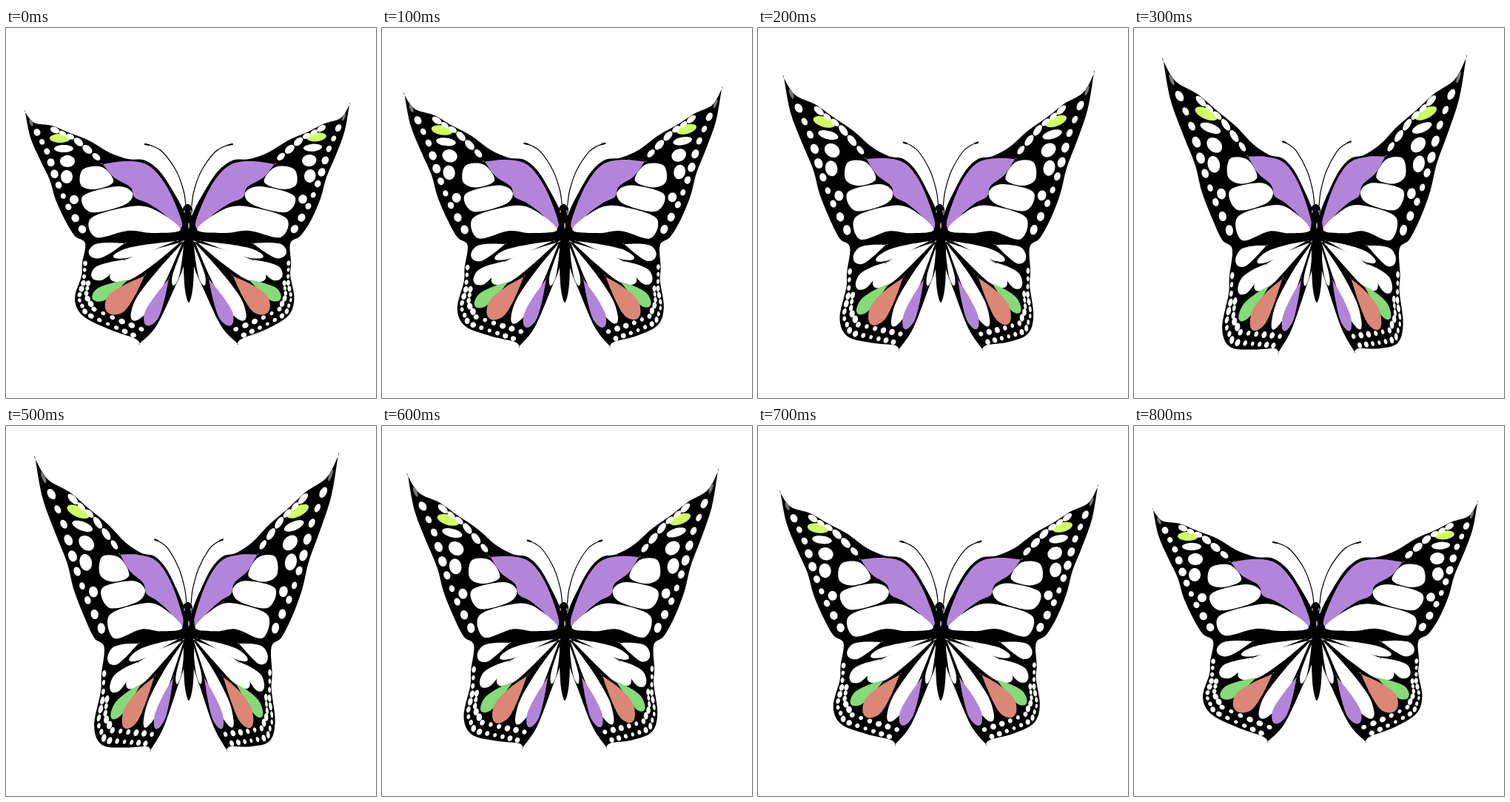
Write an HTML page with a canvas that moves like this. It is 500 by 500 pixels and loops after 900 ms.

```html
<!DOCTYPE html>
<html lang="en">
<head>
<meta charset="utf-8">
<title>Butterfly</title>
<style>
  html, body { margin: 0; width: 100%; height: 100%; overflow: hidden; background: #fff; }
  canvas { display: block; width: 100vmin; height: 100vmin; }
</style>
</head>
<body>
<canvas id="stage" width="500" height="500"></canvas>
<script>
const ctx = document.getElementById('stage').getContext('2d');
const PURPLE = '#b385da', LIME = '#d3fb62', GREEN = '#84db78', CORAL = '#dc8676';
const AXIS = 247, HINGE = 268, SPAN = 221;
const pairs = list => list.flatMap((v, i) => i % 2 ? [] : [[v, list[i + 1]]]);
const mix = (p, q, f) => p.map((v, i) => v + f * (q[i] - v));

// Raising a wing narrows it, except at the tip, and stretches it away from the hinge line.
function flap([x, y], lift, isRight) {
  let u = AXIS - x;
  const v = y - HINGE;
  if (isRight) {
    const lower = Math.max(0, Math.min(1, v / 80));
    u -= (u / SPAN) ** 4 * (4 + 45 * lower);
  }
  const stretch = (u / (v < 0 ? 286 : 210)) ** 2;
  const tilt = isRight ? (u / SPAN) ** 8 * (12 - 6 * lift) : 0;
  const width = u - lift * (0.3 * u - 48 * (u / SPAN) ** 4);
  return [AXIS + (isRight ? width : -width), HINGE + v * (1 + lift * stretch) - tilt];
}

// Smooth curve through all points; a doubled point makes a corner.
function trace(pts, closed) {
  const n = pts.length;
  const at = i => closed ? pts[(i + n) % n] : pts[Math.max(0, Math.min(n - 1, i))];
  ctx.beginPath();
  ctx.moveTo(...pts[0]);
  for (let i = 0; i < (closed ? n : n - 1); i++) {
    const [a, b, c, d] = [at(i - 1), at(i), at(i + 1), at(i + 2)];
    ctx.bezierCurveTo(b[0] + (c[0] - a[0]) / 6, b[1] + (c[1] - a[1]) / 6,
                      c[0] - (d[0] - b[0]) / 6, c[1] - (d[1] - b[1]) / 6, c[0], c[1]);
  }
}
function fillShape(color, pts) {
  ctx.fillStyle = color;
  trace(pts, true);
  ctx.fill();
}
function ellipse(cx, cy, rx, ry, angle = 0) {
  const cos = Math.cos(angle), sin = Math.sin(angle);
  return Array.from({ length: 10 }, (_, i) => {
    const a = i * Math.PI / 5, u = rx * Math.cos(a), v = ry * Math.sin(a);
    return [cx + u * cos - v * sin, cy + u * sin + v * cos];
  });
}

const shapes = [];
const cell = (color, ...list) => shapes.push([color, pairs(list)]);
const spot = (color, ...e) => shapes.push([color, ellipse(...e)]);

// Teardrop with its point at (x0, y0) and its round end at (x1, y1).
function petal(color, x0, y0, x1, y1, width) {
  const dx = x1 - x0, dy = y1 - y0, k = width / 2 / Math.hypot(dx, dy);
  const at = (f, side) => [x0 + f * dx - side * k * dy, y0 + f * dy + side * k * dx];
  shapes.push([color, [at(0, 0), at(0, 0), at(0.4, 0.68), at(0.75, 1), at(0.94, 0.6),
    at(1, 0), at(0.94, -0.6), at(0.75, -1), at(0.4, -0.68)]]);
}

// Evenly spaced dots of varied size, stretched along their path.
function dotRow(list, count, radius, stretch) {
  const path = pairs(list);
  for (let i = 0; i < count; i++) {
    const s = i / (count - 1) * (path.length - 1);
    const k = Math.min(path.length - 2, Math.floor(s)), [p, q] = [path[k], path[k + 1]];
    const r = radius * (1 + 0.2 * Math.sin(i * 5));
    spot('#fff', ...mix(p, q, s - k), r * stretch, r, Math.atan2(q[1] - p[1], q[0] - p[0]));
  }
}

// Silhouette: leading edge, inner margin, scalloped rim, outer edge
cell('#000', 26,114, 26,114, 38,128, 62,132, 84,141, 112,152, 139,168, 165,177, 188,179,
  208,194, 226,221, 240,247, 246,270, 241,318, 226,355, 203,403, 181,426, 181,426,
  173,419, 139,407, 104,389, 93,366, 102,335, 103,318, 107,291, 93,281, 80,260,
  67,232, 59,205, 46,178, 33,148);

// Upper wing
cell(PURPLE, 131,184, 131,184, 160,180, 187,183, 206,198, 223,225, 238,264, 230,270,
  214,252, 192,237, 174,229, 168,215, 146,202);
cell('#fff', 104,191, 130,188, 145,208, 120,218, 101,212);
cell('#fff', 104,227, 150,214, 171,223, 160,239, 115,249);
cell('#fff', 114,258, 158,243, 195,243, 236,272, 198,277, 165,274, 122,283);
spot(LIME, 73,149, 14,6);
spot('#777', 34,128, 2,5, -0.4);
dotRow([66,138, 92,149, 122,174], 6, 4, 1.6);
dotRow([42,141, 57,170, 68,205, 82,238, 103,272], 10, 4.4, 1.1);
spot('#fff', 78,163, 13,5);
spot('#fff', 83,180, 10,8);
spot('#fff', 82,201, 8,9);
spot('#fff', 92,232, 6,6);

// Lower wing
petal('#fff', 160,291, 112,305, 20);
petal('#fff', 229,288, 145,309, 13);
petal('#fff', 160,313, 116,337, 20);
petal('#fff', 235,290, 141,339, 27);
petal('#fff', 238,291, 171,395, 24);
petal('#fff', 240,295, 226,348, 9);
petal(GREEN, 165,340, 117,366, 19);
petal(CORAL, 187,335, 137,384, 30);
petal(PURPLE, 220,339, 190,402, 20);
dotRow([107,318, 105,343, 98,365, 108,386, 140,401, 172,415], 15, 2.9, 1.2);
dotRow([111,345, 108,362, 119,380, 150,394, 183,407], 11, 3.2, 1.2);

const antenna = pairs([243,240, 240,220, 230,193, 212,168, 199,160, 188,157]);
const antennaTip = pairs([193,158, 188,157]);

function drawWing(lift, isRight) {
  const place = pts => pts.map(p => flap(p, lift, isRight));
  shapes.forEach(([color, pts]) => fillShape(color, place(pts)));
  [[antenna, 1.2], [antennaTip, 2.2]].forEach(([pts, width]) => {
    ctx.lineWidth = width;
    trace(place(pts), false);
    ctx.stroke();
  });
}

function drawBody() {
  fillShape('#000', ellipse(245.5,246, 6.5,8));
  fillShape('#000', ellipse(247,273, 8,23));
  fillShape('#000', pairs([241,290, 253,290, 253,345, 247,371, 241,345]));
  [241, 250].forEach(x => fillShape('#888', ellipse(x,248, 1,2)));
  fillShape('#999', ellipse(247,267, 1.2,4));
}

function draw(now) {
  const step = Math.floor(now / 100) % 9;
  const lift = 1 - Math.abs(4 - step) / 4;
  ctx.fillStyle = '#fff';
  ctx.fillRect(0, 0, 500, 500);
  ctx.strokeStyle = '#000';
  ctx.lineCap = 'round';
  drawWing(lift, false);
  drawWing(lift, true);
  drawBody();
  requestAnimationFrame(draw);
}
draw(0);
</script>
</body>
</html>
```
